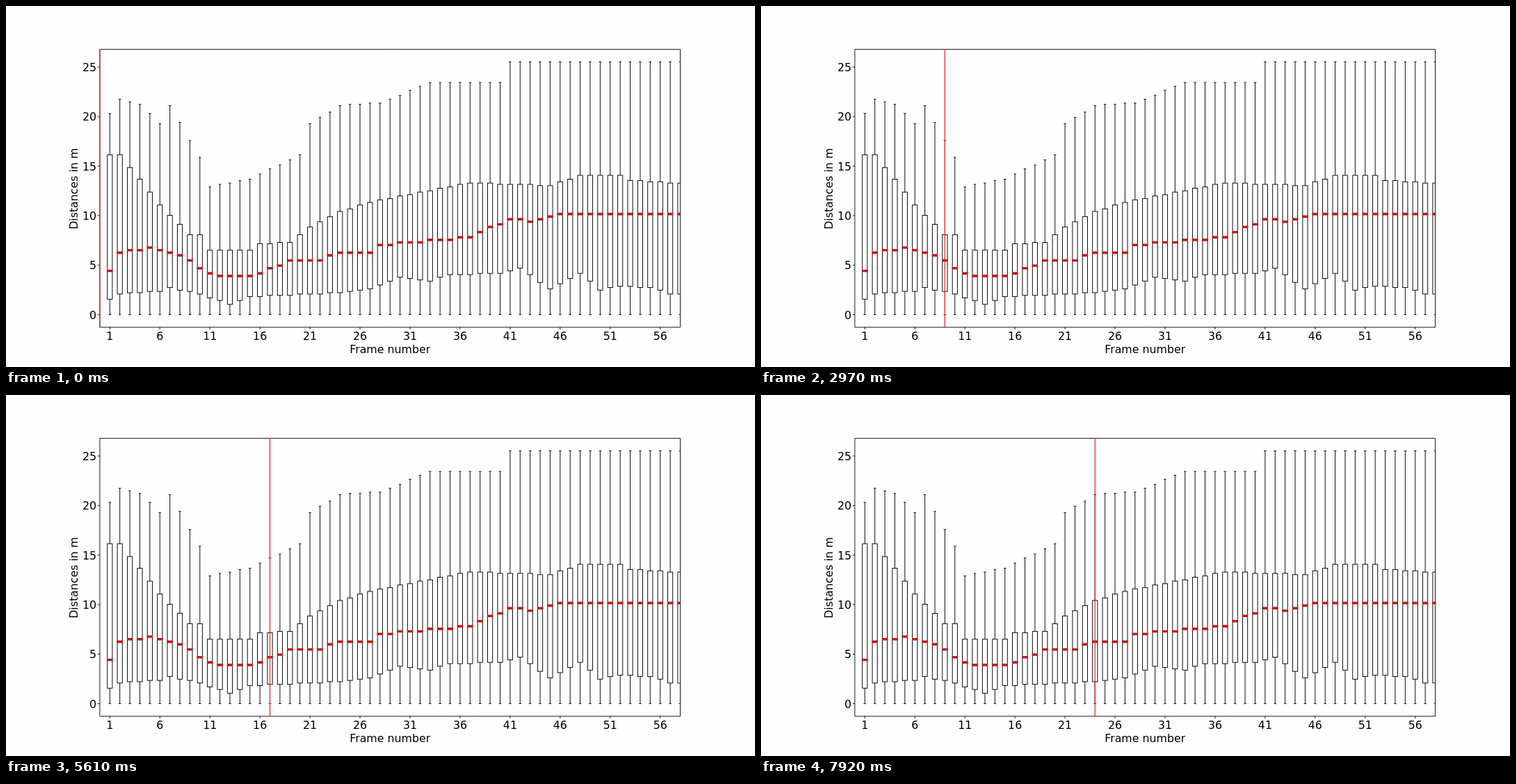
Animation, 1077 px wide and 520 px high, one loop 8 s. Source, as an HTML page with a canvas:

```html
<!DOCTYPE html>
<html lang="en">
<head>
<meta charset="utf-8">
<title>Distances per frame</title>
<style>
  html, body { margin: 0; width: 100%; height: 100%; overflow: hidden; background: #fefefe; }
  canvas { display: block; }
</style>
</head>
<body>
<canvas id="chart" width="1077" height="520"></canvas>
<script>
const ctx = document.getElementById("chart").getContext("2d");

const PLOT = { left: 134.9, top: 62.4, right: 969.5, bottom: 462.8 };
const COUNT = 58;
const STEP = (PLOT.right - PLOT.left) / COUNT;
const BOX = STEP / 2;
const ZERO_Y = 444.6;
const METRE = 14.27;
const UNIT = METRE * 25 / 192; // one measuring step in pixels
const LOOP = 8000, HOLD = 330;

// Turning points [position, measuring steps]; straight trends run between them.
const maximum = trend([[1, 156], [2, 167], [4, 163], [6, 148], [7, 162], [10, 122], [11, 99],
  [15, 105], [20, 124], [21, 148], [24, 162], [28, 164], [33, 180], [40, 180], [41, 196]]);
const upper = trend([[2, 124], [6, 85], [9, 62], [10, 62], [11, 50], [15, 50], [16, 55], [19, 56],
  [21, 68], [24, 80], [28, 89], [37, 102], [45, 100], [48, 108], [52, 108], [53, 104], [58, 102]]);
const median = trend([[1, 34], [2, 48], [5, 52], [8, 46], [11, 31], [15, 30], [19, 41], [22, 42],
  [24, 48], [27, 48], [28, 54], [37, 60], [41, 74], [43, 72], [46, 78]], 2);
const lower = trend([[1, 12], [2, 16], [6, 18], [7, 21], [10, 16], [13, 8], [15, 14], [24, 17],
  [27, 20], [30, 29], [33, 26], [35, 31], [40, 32], [42, 36], [45, 20], [48, 32], [50, 19],
  [52, 22], [55, 21], [57, 16]]);

function trend(points, grid = 1) {
  return n => {
    const next = points.findIndex(([at]) => at >= n);
    if (next < 0) return points[points.length - 1][1];
    const [x2, v2] = points[next];
    const [x1, v1] = points[Math.max(next - 1, 0)];
    const value = x1 === x2 ? v2 : v1 + (v2 - v1) * (n - x1) / (x2 - x1);
    return Math.round(value / grid) * grid;
  };
}

const xAt = n => PLOT.left + n * STEP;
const yAt = units => ZERO_Y - units * UNIT;

function line(x1, y1, x2, y2, color = "#000", width = 0.95) {
  ctx.strokeStyle = color;
  ctx.lineWidth = width;
  ctx.beginPath();
  ctx.moveTo(x1, y1);
  ctx.lineTo(x2, y2);
  ctx.stroke();
}

function whisker(x, from, to) {
  line(x, from, x, to);
  line(x - BOX / 4, to, x + BOX / 4, to);
}

function plotRect() {
  ctx.beginPath();
  ctx.rect(PLOT.left, PLOT.top, PLOT.right - PLOT.left, PLOT.bottom - PLOT.top);
}

function drawBoxes() {
  ctx.save();
  plotRect();
  ctx.clip();
  for (let n = 1; n <= COUNT; n++) {
    const x = xAt(n), high = yAt(upper(n)), low = yAt(lower(n)), mid = yAt(median(n));
    whisker(x, high, yAt(maximum(n)));
    whisker(x, low, ZERO_Y);
    ctx.strokeRect(x - BOX / 2, high, BOX, low - high);
    line(x - BOX / 2 - 0.6, mid, x + BOX / 2 + 0.6, mid, "#c4181a", 3.6);
  }
  ctx.restore();
}

function drawAxes() {
  ctx.strokeStyle = "#000";
  ctx.lineWidth = 0.9;
  plotRect();
  ctx.stroke();
  ctx.fillStyle = "#000";
  ctx.font = '15.8px "DejaVu Sans", sans-serif';

  ctx.textAlign = "center";
  for (let n = 1; n < COUNT; n += 5) {
    line(xAt(n), PLOT.bottom, xAt(n), PLOT.bottom + 3);
    ctx.fillText(n, xAt(n), 481.4);
  }
  ctx.fillText("Frame number", 552.2, 500);

  ctx.save();
  ctx.translate(102.8, 263.3);
  ctx.rotate(-Math.PI / 2);
  ctx.fillText("Distances in m", 0, 0);
  ctx.restore();

  ctx.textAlign = "right";
  for (let metres = 0; metres <= 25; metres += 5) {
    const y = ZERO_Y - metres * METRE;
    line(PLOT.left - 3, y, PLOT.left, y);
    ctx.fillText(metres, 130, y + 6);
  }
}

function draw(now) {
  const x = xAt(Math.floor((now % LOOP) / HOLD));
  ctx.fillStyle = "#fefefe";
  ctx.fillRect(0, 0, 1077, 520);
  drawBoxes();
  drawAxes();
  line(x, PLOT.top - 0.5, x, PLOT.bottom + 0.5, "#e42020", 1.2);
}

const start = performance.now();
function tick() {
  draw(performance.now() - start);
  requestAnimationFrame(tick);
}
tick();
</script>
</body>
</html>
```
